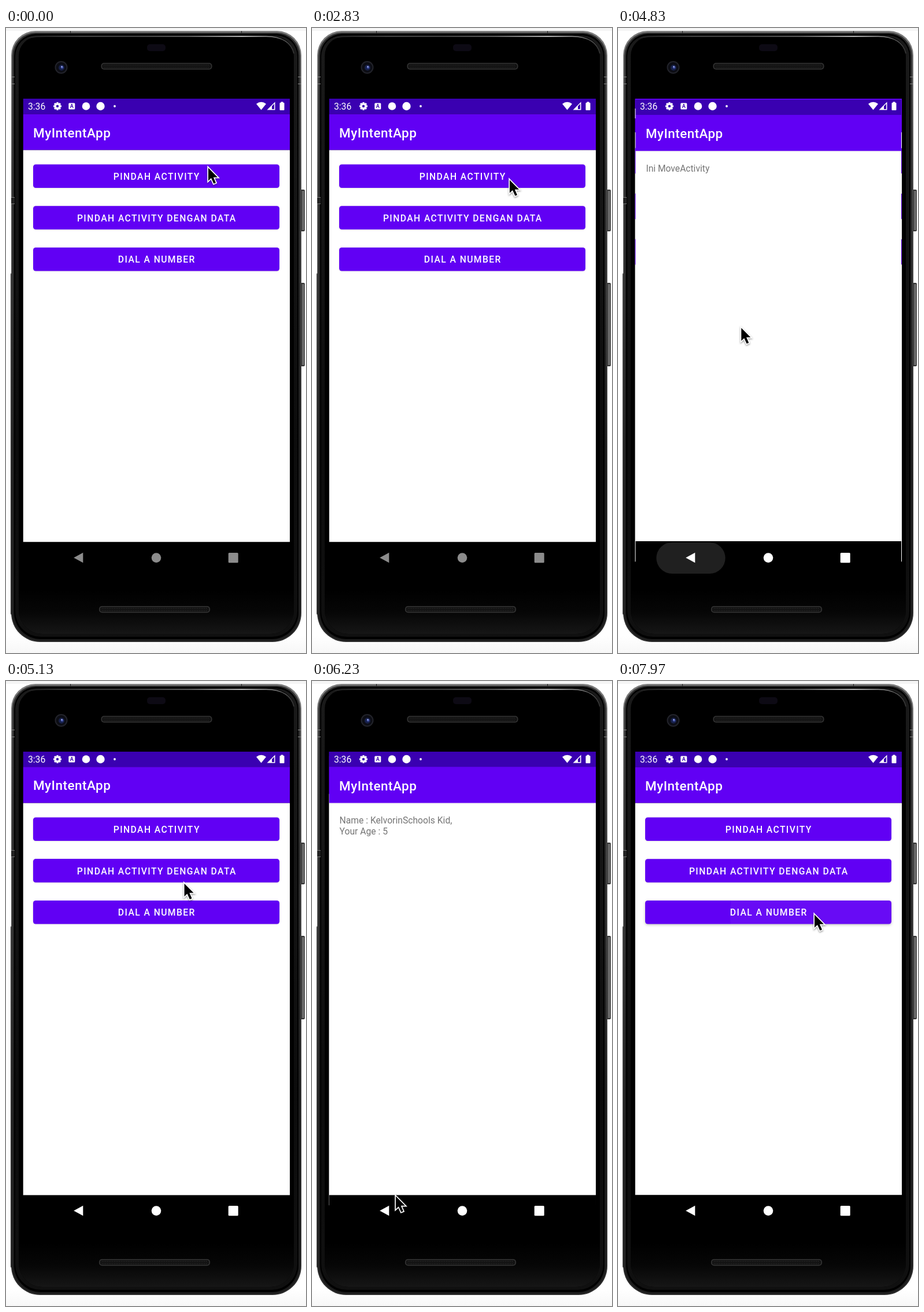
An HTML page with a canvas that plays this animation: 519 by 1079 pixels, repeating every 8 s.

```html
<!DOCTYPE html>
<html lang="id">
<head>
<meta charset="utf-8">
<title>MyIntentApp</title>
<style>
html, body { margin: 0; width: 100%; height: 100%; overflow: hidden; background: #fff; }
canvas { display: block; }
</style>
</head>
<body>
<canvas id="stage" width="519" height="1079"></canvas>
<script>
const c = document.getElementById('stage').getContext('2d');
const LOOP = 8000, TRANSITION = 400;
const PURPLE = '#6100f4', DARK = '#3a00b1';
const SCREEN = { x: 29.5, y: 122, w: 461.5, h: 822 };
const CENTER = { x: 260, y: 533 };
const FONT = 'Roboto, "Noto Sans", sans-serif';

const clamp = (v, a = 0, b = 1) => Math.min(b, Math.max(a, v));

function rect(x, y, w, h, fill, r = 0) {
  c.fillStyle = fill;
  c.beginPath();
  c.roundRect(x, y, w, h, r);
  c.fill();
}
function disc(x, y, r, fill) {
  c.fillStyle = fill;
  c.beginPath();
  c.arc(x, y, r, 0, 7);
  c.fill();
}
function poly(points, fill) {
  c.fillStyle = fill;
  c.beginPath();
  points.forEach(p => c.lineTo(...p));
  c.closePath();
  c.fill();
}
function text(str, x, y, size, fill, { weight = 400, align = 'left', spacing = 0 } = {}) {
  c.font = `${weight} ${size}px ${FONT}`;
  c.letterSpacing = spacing + 'px';
  c.textAlign = align;
  c.fillStyle = fill;
  c.fillText(str, x, y);
}
function fade(x0, y0, x1, y1, ...colors) {
  const g = c.createLinearGradient(x0, y0, x1, y1);
  colors.forEach((color, i) => g.addColorStop(i / (colors.length - 1), color));
  return g;
}

// Android's "fast out, extra slow in" curve: two joined cubic Béziers
function fastOutSlowIn(t) {
  if (t <= 0 || t >= 1) return clamp(t);
  const [px, py] = t < 1 / 6
    ? [[0, .05, .13333, 1 / 6], [0, 0, .06, .4]]
    : [[1 / 6, .20833, .25, 1], [.4, .82, 1, 1]];
  const at = (p, u) => {
    const v = 1 - u;
    return p[0] * v * v * v + 3 * p[1] * u * v * v + 3 * p[2] * u * u * v + p[3] * u * u * u;
  };
  let lo = 0, hi = 1;
  for (let i = 0; i < 24; i++) {
    const mid = (lo + hi) / 2;
    if (at(px, mid) < t) lo = mid; else hi = mid;
  }
  return at(py, lo);
}

// Pointer tip: time, x, y
const PATH = [
  [0, 349, 240], [2830, 341, 261], [3370, 341, 261], [3670, 236, 479],
  [4150, 128, 914], [4300, 124, 924], [4560, 124, 924], [4830, 212, 517],
  [5250, 322, 328], [5640, 322, 328], [5900, 256, 572], [6350, 128, 930],
  [6980, 128, 930], [7130, 143, 878], [7530, 318, 442], [7800, 339, 402], [8000, 339, 402]
];
function pathAt(t, axis) {
  const slope = i => PATH[i + 1] && PATH[i]
    ? (PATH[i + 1][axis] - PATH[i][axis]) / (PATH[i + 1][0] - PATH[i][0]) : 0;
  const tangent = i => {
    const a = slope(i - 1), b = slope(i);
    return a * b > 0 ? 2 * a * b / (a + b) : 0;
  };
  const i = Math.max(0, PATH.findIndex(p => p[0] > t) - 1);
  const [p, q] = [PATH[i], PATH[i + 1]], d = q[0] - p[0], u = (t - p[0]) / d, v = 1 - u;
  return p[axis] * v * v * (1 + 2 * u) + q[axis] * u * u * (3 - 2 * u)
    + d * u * v * (tangent(i) * v - tangent(i + 1) * u);
}

function drawSpeaker(x, y) {
  rect(x, y, 192, 11.5, '#343434', 5);
  rect(x + 1.5, y + 1.5, 189, 8.5, '#131313', 4);
  c.fillStyle = '#272727';
  for (let i = 5; i < 187; i += 3) {
    c.fillRect(x + i, y + 3, 1, 2);
    c.fillRect(x + i, y + 7, 1, 2);
  }
}

function drawPhone() {
  rect(0, 0, 519, 1079, '#fff');
  rect(0, 0, 519, 5, '#f5f5f5');
  rect(0, 1050, 519, 29, fade(0, 1050, 0, 1079, '#fff', '#f7f7f7'));

  for (const [y, h] of [[279, 72], [440, 144]]) {
    rect(508, y, 9, h, '#333', 2);
    rect(512, y + 2, 4, h - 4, '#6c6c6c', 1);
  }
  rect(8, 423, 8, 590, '#222', 2);
  rect(9, 5, 502, 1055, fade(0, 5, 0, 1060, '#7c7c7c', '#4c4c4c', '#404040', '#2c2c2c', '#2c2c2c'), [42, 42, 50, 50]);
  rect(11, 8, 498, 1050, fade(0, 8, 0, 1058, '#333', '#2a2a2a', '#1c1c1c', '#1c1c1c'), [40, 40, 48, 48]);
  rect(14, 10, 492, 1045, '#000', [38, 38, 46, 46]);
  rect(16, 13, 488, 1038, fade(0, 13, 0, 1051, '#1a1a1a', '#141414', '#0c0c0c', '#101010'), [36, 36, 44, 44]);
  rect(22, 15, 476, 1031, '#000', [33, 33, 41, 41]);
  rect(22, 970, 476, 76, fade(0, 970, 0, 1046, '#000', '#060606', '#161616'), [0, 0, 41, 41]);
  for (const y of [84, 96]) {
    rect(9, y, 6, 1, '#888');
    rect(505, y, 6, 1, '#888');
  }
  rect(9, 292, 6, 11, '#222');
  rect(9, 292, 6, 1, '#777');
  rect(9, 303, 6, 1, '#777');
  rect(111, 5, 1, 5, '#222');
  rect(407, 5, 1, 5, '#222');

  c.strokeStyle = fade(40, 0, 500, 0, '#222', '#555', '#555', '#777', '#eee', '#333');
  c.lineWidth = 1.5;
  c.beginPath();
  c.moveTo(40, 17);
  c.quadraticCurveTo(50, 14.5, 70, 14.5);
  c.lineTo(450, 14.5);
  c.quadraticCurveTo(491, 15, 498, 44);
  c.stroke();

  rect(244, 28, 32, 12, '#0d0a14', 5);
  drawSpeaker(164.5, 60.2);
  drawSpeaker(161, 998);
  disc(95.5, 68, 11, '#22232a');
  disc(95.5, 68, 9, '#0c0d14');
  disc(96, 68.5, 5, '#17204a');
  disc(97, 68, 2.3, '#4152a5');
  disc(96.5, 66.8, 1.2, '#a9b4ee');
}

const BUTTONS = [
  { label: 'PINDAH ACTIVITY', y: 235.5, press: 3350 },
  { label: 'PINDAH ACTIVITY DENGAN DATA', y: 307.2, press: 5790 },
  { label: 'DIAL A NUMBER', y: 379, press: 7900 }
];

function drawButton({ label, y, press }, t) {
  const age = t - press, pressed = age >= 0 && age < 450;
  c.save();
  c.shadowColor = `rgba(0,0,0,${pressed ? .25 : .15})`;
  c.shadowBlur = pressed ? 4 : 2;
  c.shadowOffsetY = pressed ? 1.5 : .5;
  rect(47, y, 426, 40.6, PURPLE, 4.5);
  c.restore();
  if (pressed) {
    c.save();
    c.beginPath();
    c.roundRect(47, y, 426, 40.6, 4.5);
    c.clip();
    const alpha = .045 * clamp(age / 60) * clamp((450 - age) / 200);
    disc(pathAt(press, 1), y + 24, 60 + age * 1.2, `rgba(255,255,255,${alpha})`);
    c.restore();
  }
  text(label, 260.8, y + 26.4, 15.7, '#fff', { weight: 500, align: 'center', spacing: 1.4 });
}

const SCREENS = {
  main: t => BUTTONS.forEach(b => drawButton(b, t)),
  move: () => text('Ini MoveActivity', 47.5, 246.7, 15.7, '#757575'),
  data: () => {
    text('Name : KelvorinSchools Kid,', 47.5, 246, 15.7, '#757575');
    text('Your Age : 5', 47.5, 264.5, 15.7, '#757575');
  }
};

function drawWindow(name, t, scale = 1, alpha = 1) {
  if (alpha <= 0) return;
  const { x, y, w, h } = SCREEN;
  c.save();
  c.globalAlpha = alpha;
  c.translate(CENTER.x, CENTER.y);
  c.scale(scale, scale);
  c.translate(-CENTER.x, -CENTER.y);
  rect(x, y, w, 26.5, DARK);
  rect(x, 148.5, w, 62.3, PURPLE);
  rect(x, 210.8, w, 676.7, '#fff');
  rect(x, 210.8, w, 3, fade(0, 210.8, 0, 213.8, 'rgba(0,0,0,.06)', 'rgba(0,0,0,0)'));
  rect(x, 887.5, w, y + h - 887.5, '#000');
  text('MyIntentApp', 47, 188.6, 22.5, '#fff', { weight: 500, spacing: .5 });
  SCREENS[name](t);
  c.restore();
}

const VISITS = [
  { name: 'move', open: 3420, close: 4803 },
  { name: 'data', open: 5849, close: 7119 }
];

function drawScreen(t) {
  c.save();
  c.beginPath();
  c.rect(SCREEN.x, SCREEN.y, SCREEN.w, SCREEN.h);
  c.clip();
  const visit = VISITS.find(v => t >= v.open && t < v.close + TRANSITION);
  if (!visit) {
    drawWindow('main', t);
  } else {
    const closing = t >= visit.close;
    const age = t - (closing ? visit.close : visit.open);
    const p = fastOutSlowIn(age / TRANSITION);
    if (closing) {
      drawWindow('main', t, 1.1 - .1 * p);
      drawWindow(visit.name, t, 1 - .1 * p, 1 - clamp((age - 35) / 83));
    } else {
      drawWindow('main', t, 1 + .05 * p);
      drawWindow(visit.name, t, .85 + .15 * p, clamp((age - 50) / 83));
    }
  }
  c.restore();
}

function drawStatus() {
  text('3:36', 38, 140.6, 15.7, '#fff');
  for (let i = 0; i < 8; i++) {
    c.save();
    c.translate(89, 135);
    c.rotate(i * Math.PI / 4);
    rect(-1.8, -7, 3.6, 4, '#fff', 1);
    c.restore();
  }
  disc(89, 135, 5.2, '#fff');
  disc(89, 135, 2.2, DARK);
  rect(108.3, 129.5, 11, 11, '#fff', 1.5);
  text('A', 113.8, 138.4, 9, DARK, { weight: 700, align: 'center' });
  disc(138.5, 135, 6.8, '#fff');
  disc(163.5, 135, 7.2, '#fff');
  disc(188, 135, 1.9, '#fff');

  c.fillStyle = '#fff';
  c.beginPath();
  c.moveTo(441.5, 141.5);
  c.lineTo(433, 131);
  c.quadraticCurveTo(441.5, 124.5, 450, 131);
  c.fill();
  poly([[451.5, 141.5], [465.5, 141.5], [465.5, 127.5]], '#fff');
  poly([[460, 140], [464, 140], [464, 131], [460, 135]], DARK);
  rect(473.5, 129, 8, 13, '#fff', 1);
  rect(475.5, 127.5, 4, 2, '#fff');
}

const BACK_PRESSES = [4610, 6964];

function drawNav(t) {
  for (const press of BACK_PRESSES) {
    const age = t - press;
    if (age < 0 || age > 430) continue;
    const grow = .92 + .08 * (1 - (1 - clamp(age / 300)) ** 2);
    const alpha = .2 * clamp(age / 40) * (1 - clamp((age - 100) / 330));
    rect(126 - 60 * grow, 888, 120 * grow, 54, `rgba(255,255,255,${alpha})`, 27);
  }
  const tint = t < BACK_PRESSES[0] ? '#8c8c8c' : '#fff';
  poly([[117.2, 914.5], [133.3, 905.8], [133.3, 923.2]], tint);
  disc(260, 914.6, 8.3, tint);
  rect(384.7, 906, 17, 17.2, tint, 1.5);
}

function drawPointer(t) {
  const shape = new Path2D('M1 3V25.3L6 20.6L10.4 30.3L14 28.7L9.8 19.2H17Z');
  c.save();
  c.translate(pathAt(t, 1), pathAt(t, 2) - 1.5);
  c.lineWidth = 3.4;
  c.strokeStyle = '#fff';
  c.shadowColor = 'rgba(0,0,0,.4)';
  c.shadowBlur = 3;
  c.shadowOffsetY = 1.5;
  c.stroke(shape);
  c.shadowColor = 'transparent';
  c.fillStyle = '#000';
  c.fill(shape);
  c.restore();
}

function render() {
  const t = performance.now() % LOOP;
  drawPhone();
  drawScreen(t);
  drawStatus();
  drawNav(t);
  drawPointer(t);
  requestAnimationFrame(render);
}
render();
</script>
</body>
</html>
```
